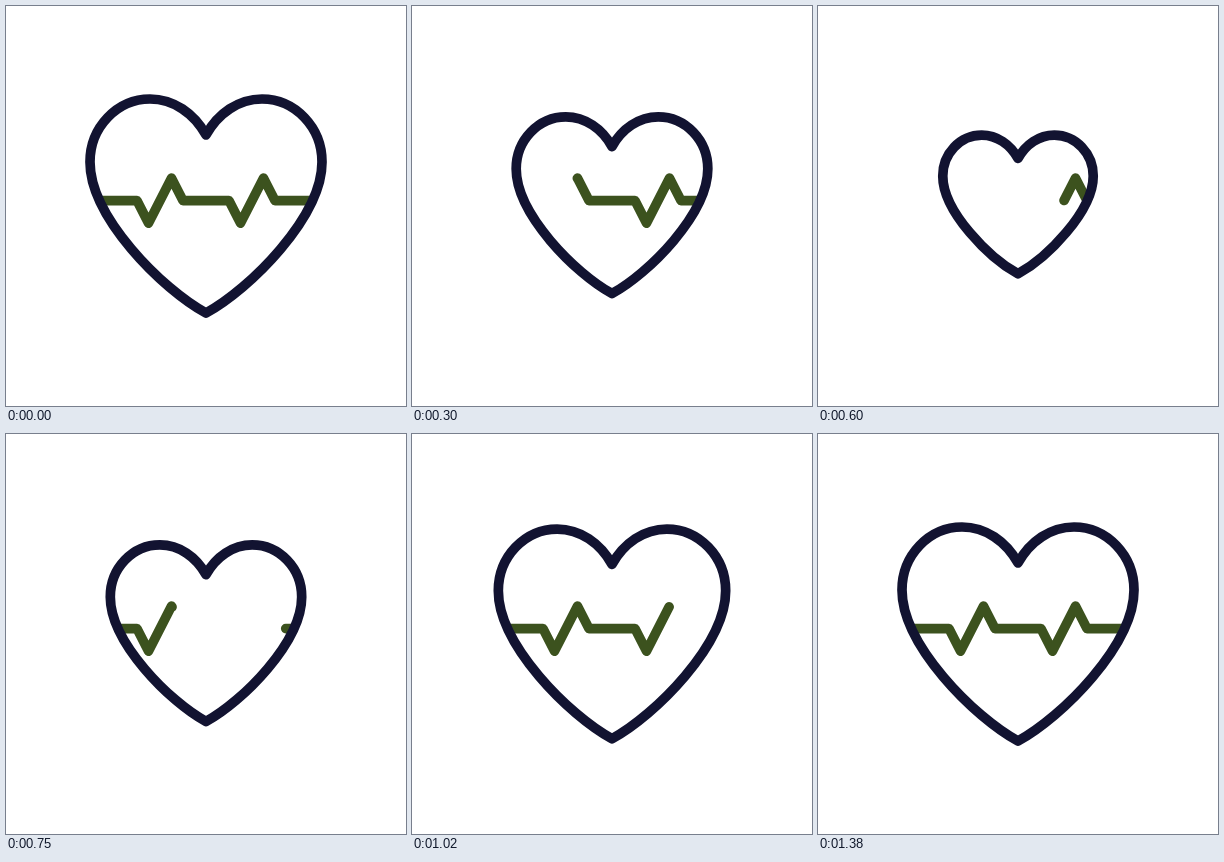
Write an HTML page that moves like this. It is 400 by 400 pixels and loops after 3.71 s.

```html
<!DOCTYPE html>
<html lang="en">
<head>
<meta charset="utf-8">
<title>Heart rate</title>
<style>
  html, body { margin: 0; width: 100%; height: 100%; overflow: hidden; background: #fff; }
  svg { display: block; width: 100%; height: 100%; }
  path { fill: none; stroke-width: 9.7; stroke-linecap: round; stroke-linejoin: round; }
  .pulse { stroke: #3c521e; }
  #heart { stroke: #121331; }
</style>
</head>
<body>
<svg viewBox="0 0 400 400">
  <clipPath id="inside"><path id="mask"/></clipPath>
  <g clip-path="url(#inside)">
    <path class="pulse" id="leaving" pathLength="1"/>
    <path class="pulse" id="entering" pathLength="1"/>
  </g>
  <path id="heart"/>
</svg>
<script>
const LOOP = 3710;
const CX = 200, CY = 195.5;
const ROUND = 0.55; // handle length of a quarter ellipse
const $ = id => document.getElementById(id);

// Key measures of a heart, relative to its centre
const REST = { dip: -66.5, topX: 56, topY: -102.5, sideX: 116, sideY: -39.5, tip: 111.5,
  dipX: 12, drop: 55, tipX: 44, tipY: 24 };
const WIDE = { dip: -49.5, topX: 59, topY: -87.5, sideX: 128.5, sideY: -28.5, tip: 105.5,
  dipX: 4, drop: 57, tipX: 22, tipY: 39 };

const clamp = x => Math.min(1, Math.max(0, x));
const smooth = u => (1 - Math.cos(Math.PI * u)) / 2;
const easeOut = u => 1 - Math.pow(1 - u, 2.5);
const blend = (a, b, k) => a + (b - a) * k;
const mapHeart = (h, fn) =>
  Object.fromEntries(Object.keys(h).map(key => [key, fn(h[key], key)]));
const scaled = s => mapHeart(REST, v => v * s);

const KEYS = [
  { at: 0, shape: REST },
  { at: 333, shape: scaled(0.822), ease: smooth },
  { at: 480, shape: WIDE, ease: smooth },
  { at: 600, shape: scaled(0.647), ease: smooth },
  { at: 1217, shape: REST, ease: easeOut }
];

function heartAt(t) {
  const n = KEYS.findIndex(k => k.at > t);
  if (n < 0) return REST;
  const a = KEYS[n - 1], b = KEYS[n];
  const k = b.ease((t - a.at) / (b.at - a.at));
  return mapHeart(a.shape, (v, key) => blend(v, b.shape[key], k));
}

function heartPath(h) {
  const half = [
    [0, h.dip],
    [h.dipX, blend(h.dip, h.topY, 0.6)], [h.topX * 0.58, h.topY], [h.topX, h.topY],
    [blend(h.topX, h.sideX, ROUND), h.topY], [h.sideX, blend(h.sideY, h.topY, ROUND)],
    [h.sideX, h.sideY],
    [h.sideX, h.sideY + h.drop], [h.tipX, h.tip - h.tipY], [0, h.tip]
  ];
  const mirrored = half.map(([x, y]) => [-x, y]).reverse();
  const points = [...half, ...mirrored.slice(1)].map(([x, y]) => [CX + x, CY + y]);
  return `M${points[0]}C${points.slice(1).join(' ')}Z`;
}

// Flat line with two beats, each one dipping and then peaking
function pulsePath() {
  const y = 194.6, step = 11.5;
  const beat = x => [0, 1, 3, 4].map(k =>
    [x + step * k, y + 22.5 * Math.sin(k * Math.PI / 2)]);
  return 'M' + [[84, y], ...beat(131), ...beat(223), [316, y]].join('L');
}

// Show only the part of a line between two fractions of its length
function trim(id, from, to) {
  const line = $(id);
  line.style.display = to > from ? '' : 'none';
  line.style.strokeDasharray = `0 ${from} ${to - from} 2`;
}

function draw(t) {
  const d = heartPath(heartAt(t));
  $('heart').setAttribute('d', d);
  $('mask').setAttribute('d', d);
  const drawn = t < 1379 ? 1 - Math.exp(-Math.max(0, t - 640) / 247) : 1;
  trim('leaving', clamp(t / 840), 1);
  trim('entering', 0, drawn);
}

for (const id of ['leaving', 'entering']) $(id).setAttribute('d', pulsePath());

const begin = performance.now();
function tick() {
  draw((performance.now() - begin) % LOOP);
  requestAnimationFrame(tick);
}
draw(0);
requestAnimationFrame(tick);
</script>
</body>
</html>
```
